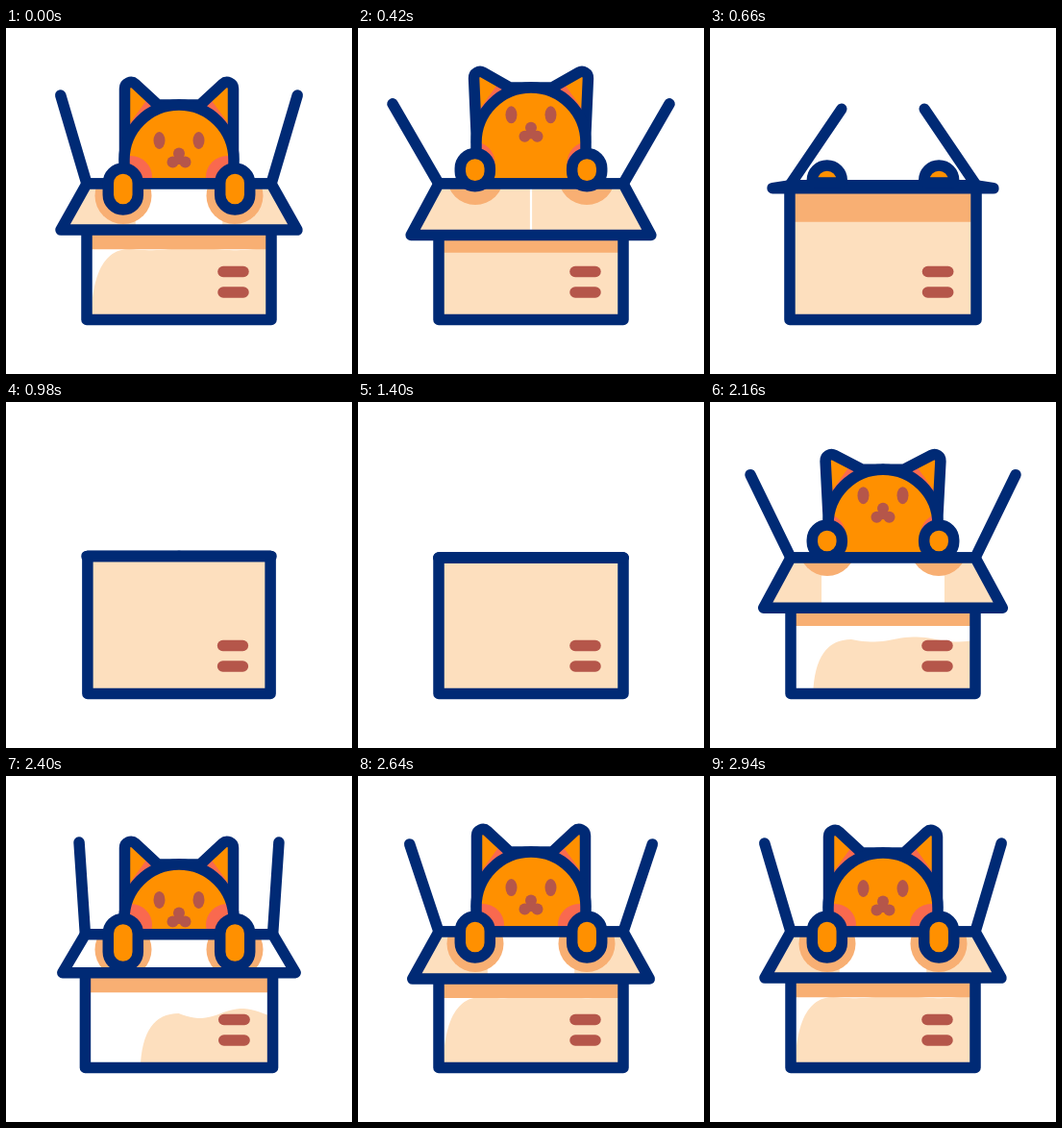
These frames come from a looping animation (360 px wide and 360 px high, 3240 ms). An HTML page with a canvas:

```html
<!DOCTYPE html>
<html lang="en">
<head>
<meta charset="utf-8">
<title>Cat in a box</title>
<style>
  html, body { margin: 0; width: 100%; height: 100%; overflow: hidden; background: #fff; }
  canvas { display: block; width: 100vmin; height: 100vmin; margin: 0 auto; }
</style>
</head>
<body>
<canvas id="stage"></canvas>
<script>
const LOOP = 3240, STEP = 20, BOTTOM = 303.5;
const NAVY = '#002a75', PEACH = '#fddfbe', TAN = '#f8af73',
      ORANGE = '#ff9000', CORAL = '#f9694f', BROWN = '#b5564a';

// [time, value] turning points, eased in between; all else follows from these.
const motion = {
  lid:    [[220, 1], [440, 1.13], [860, 0], [1690, 0], [2080, 1.13], [2390, 0.88], [2600, 1.02], [2800, 1]],
  rise:   [[220, 0], [420, 18], [640, -105], [1850, -105], [2060, 16], [2390, -12], [2600, 1], [2800, 0]],
  lift:   [[220, 0], [480, 1], [2160, 1], [2390, 0]],
  squash: [[420, 0], [660, 0.8], [1000, -0.7], [1240, 0], [1480, 0], [1660, 1], [1820, -1], [2160, 0], [2400, 1.2], [2620, 0]],
  glare:  [[220, 0.24], [440, 0], [1920, 0], [2390, 1], [2600, 0.24]]
};

const canvas = document.getElementById('stage');
const ctx = canvas.getContext('2d');

function sample(keys, t) {
  const i = keys.findIndex(k => k[0] > t);
  if (i === 0) return keys[0][1];
  if (i < 0) return keys[keys.length - 1][1];
  const [t0, a] = keys[i - 1], [t1, b] = keys[i];
  const u = (t - t0) / (t1 - t0);
  return a + (b - a) * u * u * (3 - 2 * u);
}

function pose(t) {
  const p = {};
  for (const name in motion) p[name] = sample(motion[name], t);
  const { lid, rise, lift, squash, glare } = p;
  const ajar = Math.min(1, lid / 0.25);
  const dip = Math.max(0, -rise) * (1 - lift);
  const sink = 40 * Math.max(0, 0.9 - lid) * lift;

  p.rim = 162 + 2.3 * squash;
  p.half = 96 + 1.3 * squash;
  p.angle = (90 - 106.5 * lid) * Math.PI / 180;
  p.drop = 55 * Math.sin(2.13 * (lid - 0.5)) * ajar;
  p.spread = 96 + 27 * lid ** 0.55;
  p.shade = (200 + 0.63 * p.drop - p.rim) * ajar;
  p.sheen = (40 + 90 * glare ** 2) * Math.min(1, glare / 0.2);

  // Raised paws go with a face that tilts up: ears back, eyes higher.
  p.head = 80 - rise;
  p.ear = p.head - 23 + 12 * lift;
  p.eye = p.head + 37 - 10 * lift;
  p.pawTop = 146 - 18 * lift + 0.2 * dip + sink;
  p.pawEnd = 189 - 28 * lift + 0.8 * dip;
  return p;
}

function poly(points, closed = true) {
  const path = new Path2D();
  points.forEach(([x, y]) => path.lineTo(x, y));
  if (closed) path.closePath();
  return path;
}

function rect(x, y, w, h) {
  const path = new Path2D();
  path.rect(x, y, w, h);
  return path;
}

function fill(path, color) {
  ctx.fillStyle = color;
  ctx.fill(path);
}

function stroke(path, color = NAVY) {
  ctx.strokeStyle = color;
  ctx.stroke(path);
}

function disc(x, y, rx, color, ry = rx) {
  const path = new Path2D();
  path.ellipse(x, y, rx, ry, 0, 0, 7);
  fill(path, color);
}

function clipped(path, draw) {
  ctx.save();
  ctx.clip(path);
  draw();
  ctx.restore();
}

function mirrored(draw) {
  draw();
  ctx.save();
  ctx.translate(360, 0);
  ctx.scale(-1, 1);
  draw();
  ctx.restore();
}

function drawSide({ half, rim, angle }) {
  const x = 180 - half;
  stroke(poly([[x, rim], [x + 96 * Math.sin(angle), rim - 96 * Math.cos(angle)]], false));
}

function drawEar({ head, ear, lift }) {
  const path = new Path2D();
  path.moveTo(123.5, head + 57);
  path.arcTo(123.5 - 4 * lift, ear - 9, 158, head, 6.5);
  path.lineTo(158, head);
  path.lineTo(180, head);
  fill(path, ORANGE);
  clipped(path, () => fill(poly([[124, head + 26], [150, head - 10], [165, head + 10]]), CORAL));
  stroke(path);
}

function drawCat(p) {
  const { head, eye, lift } = p;
  mirrored(() => drawEar(p));
  const face = new Path2D();
  face.moveTo(123, 320);
  face.lineTo(123, head + 57);
  face.arc(180, head + 57, 57, Math.PI, 0);
  face.lineTo(237, 320);
  fill(face, ORANGE);
  clipped(face, () => mirrored(() => disc(130 - 11 * lift, 155 - 17 * lift, 22, CORAL)));
  mirrored(() => {
    disc(159.5, eye, 6, BROWN, 9);
    disc(173.5, eye + 22.5, 6, BROWN);
  });
  disc(180, eye + 13.5, 6, BROWN);
  fill(rect(175, eye + 14, 10, 11), BROWN);
  stroke(face);
}

// Pale front with a wavy peach mound that grows to cover it.
function drawFront({ glare, rim, shade }) {
  const left = 72 + 68 * glare, top = Math.min(247, 200 + 125 * glare);
  const mound = new Path2D();
  mound.moveTo(left, 310);
  mound.quadraticCurveTo(left, top, left + 40, top);
  for (let x = left + 40; x < 290; x += 4) {
    mound.lineTo(x, top + 5 * glare * Math.sin((x - left - 40) / 14));
  }
  mound.lineTo(290, 310);
  fill(rect(70, rim, 220, 150), '#fff');
  fill(mound, PEACH);
  if (!glare) fill(rect(70, rim, 220, 150), PEACH);
  fill(rect(70, rim, 220, shade), TAN);
}

function drawBox(p) {
  const { half, rim } = p, k = half / 96;
  const box = rect(180 - half, rim, 2 * half, BOTTOM - rim);
  clipped(box, () => drawFront(p));
  for (const y of [253.5, 275]) {
    stroke(poly([[180 + 46 * k, y], [180 + 67 * k, y]], false), BROWN);
  }
  stroke(box);
}

function drawFlap({ half, rim, drop, spread, sheen, pawTop, pawEnd }) {
  const flap = poly([
    [180 - half, rim], [180 + half, rim],
    [180 + spread, rim + drop], [180 - spread, rim + drop]
  ]);
  fill(flap, PEACH);
  clipped(flap, () => {
    if (drop < 0) return;
    fill(rect(180 - sheen, rim, 2 * sheen, 80), '#fff');
    mirrored(() => disc(122, (pawTop + pawEnd) / 2 + 7, 29.5, TAN));
  });
  stroke(flap);
}

function drawPaw({ pawTop, pawEnd }) {
  const h = pawEnd - pawTop, r = 15.5;
  if (h < 1) return;
  const base = Math.min(r, Math.max(0, h - r));
  const paw = new Path2D();
  paw.roundRect(106.3, pawTop, 2 * r, h, [r, r, base, base]);
  fill(paw, ORANGE);
  stroke(paw);
}

function draw(t) {
  const p = pose(t);
  fill(rect(0, 0, 360, 360), '#fff');
  ctx.lineWidth = 11.5;
  ctx.lineCap = ctx.lineJoin = 'round';
  mirrored(() => drawSide(p));
  clipped(rect(0, 0, 360, p.rim), () => drawCat(p));
  drawBox(p);
  const layers = [() => drawFlap(p), () => mirrored(() => drawPaw(p))];
  if (p.drop < 0) layers.reverse();
  layers.forEach(layer => layer());
}

function fit() {
  const size = Math.min(innerWidth, innerHeight) * devicePixelRatio;
  canvas.width = canvas.height = Math.round(size);
  ctx.setTransform(size / 360, 0, 0, size / 360, 0, 0);
}

const start = performance.now();
function tick() {
  const t = (performance.now() - start) % LOOP;
  draw(Math.floor(t / STEP) * STEP);
  requestAnimationFrame(tick);
}

addEventListener('resize', fit);
fit();
tick();
</script>
</body>
</html>
```
